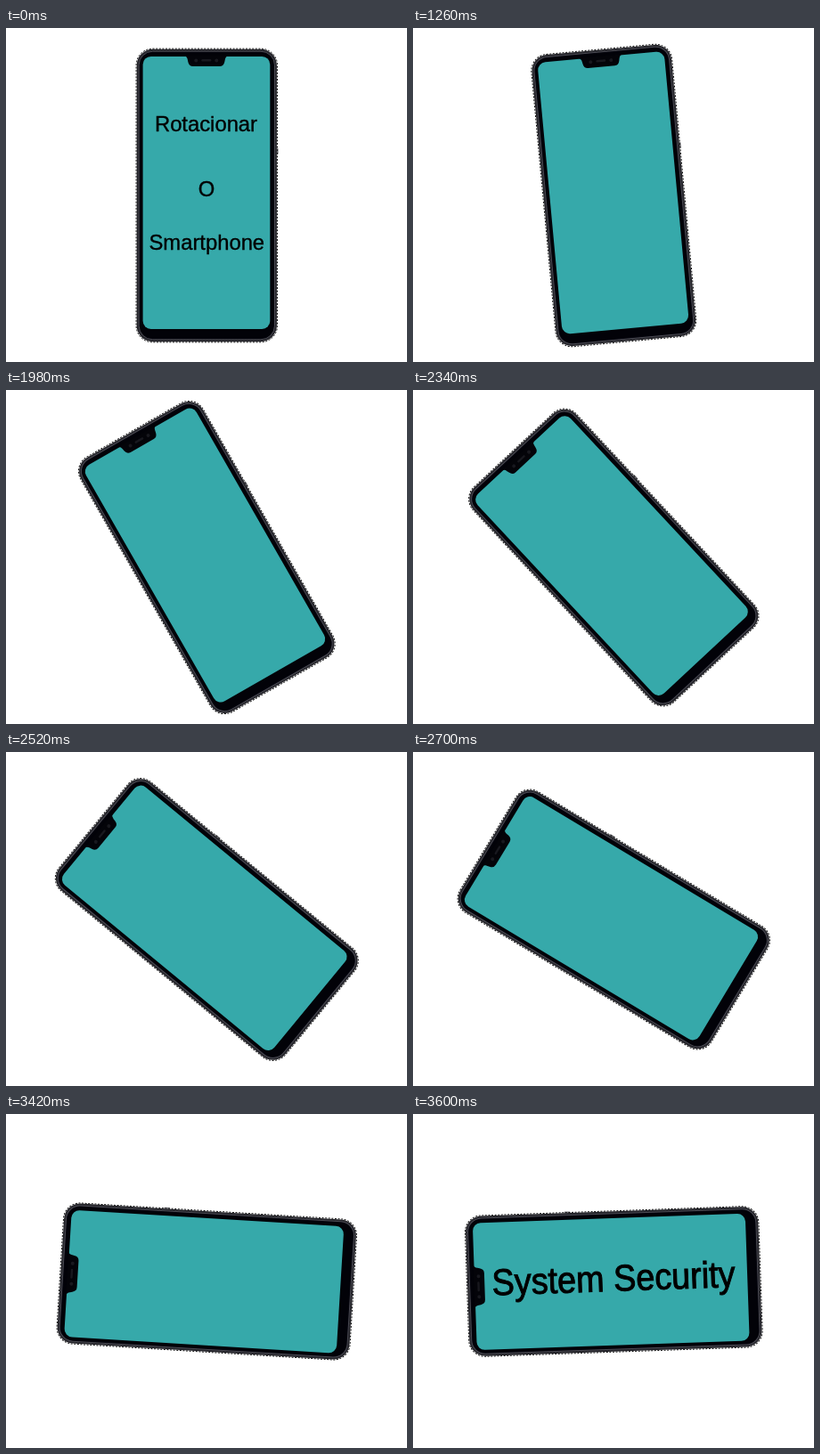
An HTML page for the animation above (4.5 s loop, 450x375 px).

```html
<!DOCTYPE html>
<html lang="pt">
<head>
<meta charset="utf-8">
<title>Rotacionar</title>
<style>
html, body { margin: 0; width: 100%; height: 100%; overflow: hidden; background: #fff; }
svg { display: block; width: 450px; height: 375px; }
text {
  font-family: "Liberation Sans", Arial, sans-serif;
  text-anchor: middle;
  fill: #000;
  stroke: #000;
}
#portrait { font-size: 23.8px; stroke-width: .35px; }
#landscape { font-size: 37.8px; stroke-width: .9px; }
</style>
</head>
<body>
<svg viewBox="0 0 450 375">
  <rect width="450" height="375" fill="#fff"/>
  <g id="phone">
    <rect x="78.5" y="-53" width="1.8" height="7" rx=".9" fill="#77777c"/>
    <rect x="-79.2" y="-164.8" width="158.4" height="329.6" rx="18.5" fill="none" stroke="#111" stroke-width="1" stroke-dasharray="2 1.6"/>
    <rect x="-78.6" y="-164.2" width="157.2" height="328.4" rx="18" fill="#25252b"/>
    <rect x="-76.2" y="-161.8" width="152.4" height="323.6" rx="15.5" fill="#05050d" stroke="#4a4a52" stroke-width="1"/>
    <rect x="-74.6" y="-160" width="149.2" height="320" rx="13" fill="#020208"/>
    <rect x="-71.7" y="-156.1" width="142.7" height="306.1" rx="9" fill="#36a9aa"/>
    <path d="M-25-157Q-22-156-21.5-152.5L-21-150Q-20-145-15.5-145H14.5Q19-145 20-150L20.5-152.5Q21-156 24-157Z" fill="#040409"/>
    <g fill="#18181e">
      <circle cx="-12" cy="-151.5" r="2"/>
      <rect x="-6" y="-153" width="11" height="2.4" rx="1.2"/>
      <circle cx="11" cy="-151.5" r="2"/>
    </g>
  </g>
  <g id="portrait">
    <text x="224.5" y="115.5">Rotacionar</text>
    <text x="225" y="188.5">O</text>
    <text x="225.3" y="249">Smartphone</text>
  </g>
  <g id="landscape" transform="translate(225.5 198.7) rotate(-2) scale(1 1.1)">
    <text>System Security</text>
  </g>
</svg>
<script>
const LOOP = 4500, START = 1260, STEP = 180;
const ANGLES = [0, 5.3, 10.9, 17, 23, 29.8, 36.5, 43, 50.5, 59, 65.8, 73.5, 80.6, 86.5, 92];
const LAST = ANGLES.length - 1;
const byId = id => document.getElementById(id);
const phone = byId("phone"), portrait = byId("portrait"), landscape = byId("landscape");
const show = (el, on) => el.setAttribute("visibility", on ? "visible" : "hidden");

function draw(ms) {
  const t = ms % LOOP;
  const step = Math.max(0, Math.min(LAST, Math.floor((t - START) / STEP) + 1));
  phone.setAttribute("transform", `translate(225.3 188) rotate(${-ANGLES[step]})`);
  show(portrait, step === 0);
  show(landscape, step === LAST);
}

const begin = performance.now();
function tick() {
  draw(performance.now() - begin);
  requestAnimationFrame(tick);
}
draw(0);
requestAnimationFrame(tick);
</script>
</body>
</html>
```
